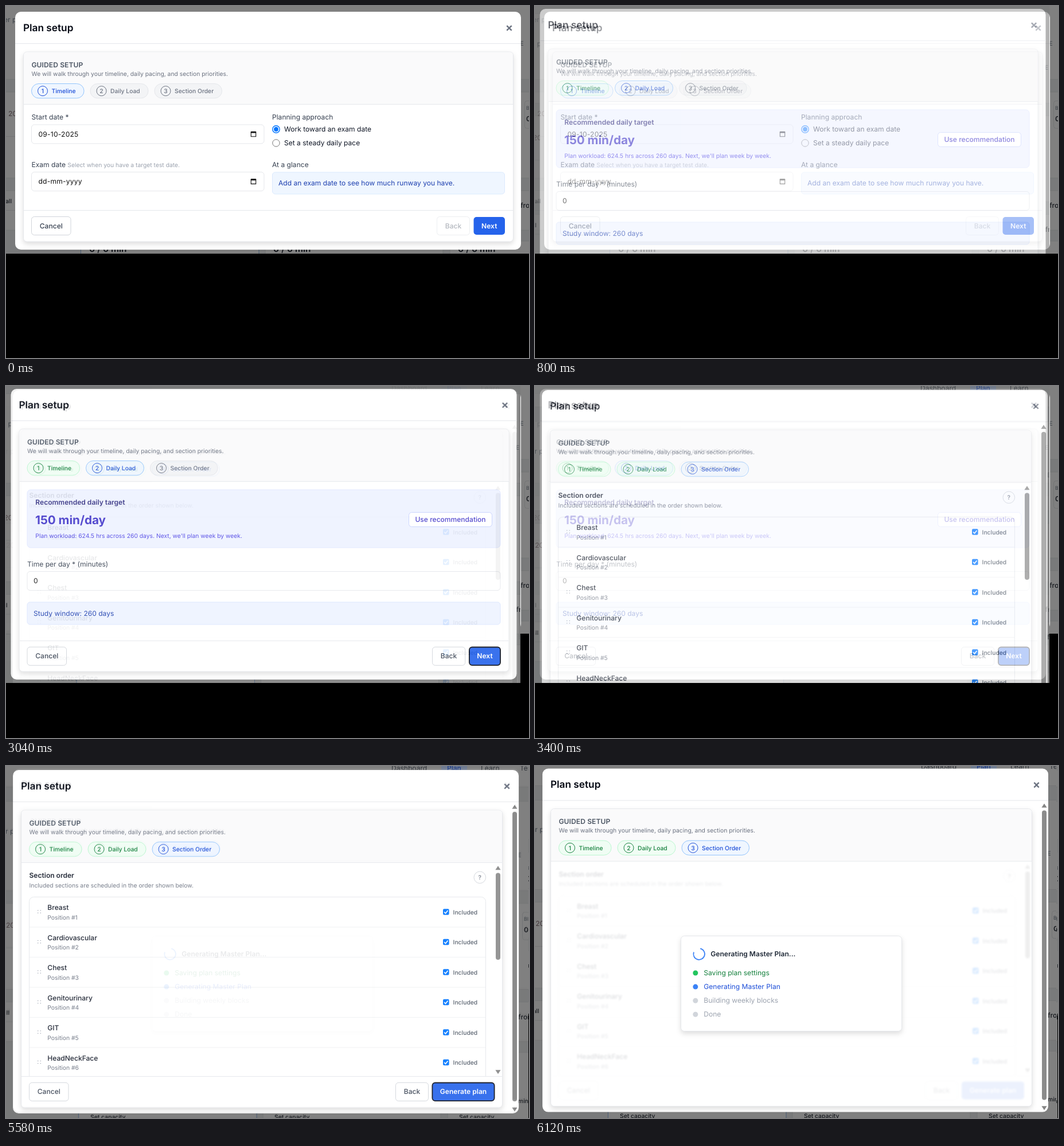
An HTML page that plays this animation: 912 by 614 pixels, repeating every 8000 ms.

```html
<!DOCTYPE html>
<html lang="en">
<head>
<meta charset="utf-8">
<title>Plan setup</title>
<style>
  html, body { margin: 0; width: 100%; height: 100%; overflow: hidden; background: #000; }
  svg { position: absolute; left: 0; top: 0; width: 912px; height: 614px; }
  text { font-family: Inter, sans-serif; text-rendering: geometricPrecision; white-space: pre; }
  .lift { filter: drop-shadow(0 4px 4px rgba(0, 0, 0, .13)); }
  .veiled { opacity: .14; filter: blur(1.7px); }

  #timeline { clip-path: inset(0 0 182px 0); }
  #load { animation: load-fade 8s infinite, load-size 8s step-end infinite; }
  #order { animation: order-fade 8s infinite, order-size 8s step-end infinite; }
  #progress { clip-path: inset(0 3px 0 0); animation: progress-fade 8s infinite; }

  /* each fade runs in ten steps of 60 ms */
  @keyframes load-fade {
    0% { opacity: 0; animation-timing-function: step-end; }
    6.25% { opacity: .1; animation-timing-function: steps(9); }
    13%, 100% { opacity: 1; }
  }
  @keyframes order-fade {
    0% { opacity: 0; animation-timing-function: step-end; }
    38% { opacity: .1; animation-timing-function: steps(9); }
    44.75%, 100% { opacity: 1; }
  }
  @keyframes progress-fade {
    0% { opacity: 0; animation-timing-function: step-end; }
    69.75% { opacity: .1; animation-timing-function: steps(9); }
    76.5%, 100% { opacity: 1; }
  }
  /* while fading, a scene only covers the area of the one below it */
  @keyframes load-size {
    0% { clip-path: inset(0 15px 182px 0); }
    13%, 100% { clip-path: inset(0 15px 96px 0); }
  }
  @keyframes order-size {
    0% { clip-path: inset(0 15px 96px 0); }
    44.75%, 100% { clip-path: inset(0 1px 0 0); }
  }
</style>
</head>
<body>
<svg id="timeline" viewBox="0 0 912 614"></svg>
<svg id="load" viewBox="0 0 912 614"></svg>
<svg id="order" viewBox="0 0 912 614"></svg>
<svg id="progress" viewBox="0 0 912 614"></svg>
<script>
const SCALE = 882 / 1024;
const SMALL = 12 * SCALE, BODY = 14 * SCALE, TITLE = 20 * SCALE, HUGE = 24 * SCALE;
const LINE = '#e5e7eb', LABEL = '#374151', MUTED = '#6b7280', BLUE = '#2563eb', CHECK = '#0075ff';

const text = (x, y, s, size = BODY, fill = LABEL, weight = 400, extra = '') =>
  `<text x="${x}" y="${y}" font-size="${size}" fill="${fill}" font-weight="${weight}" ${extra}>${s}</text>`;
const centered = (x, y, s, size, fill, weight) => text(x, y, s, size, fill, weight, 'text-anchor="middle"');
const rect = (x, y, w, h, fill, r = 0, stroke = 'none', extra = '') =>
  `<rect x="${x}" y="${y}" width="${w}" height="${h}" rx="${r}" fill="${fill}" stroke="${stroke}" ${extra}/>`;
const circle = (x, y, r, fill, stroke = 'none', width = 1) =>
  `<circle cx="${x}" cy="${y}" r="${r}" fill="${fill}" stroke="${stroke}" stroke-width="${width}"/>`;
const path = (d, stroke, width = 1, fill = 'none') =>
  `<path d="${d}" fill="${fill}" stroke="${stroke}" stroke-width="${width}"/>`;
const shift = (x, y, s, extra = '') => `<g transform="translate(${x} ${y})" ${extra}>${s}</g>`;

// Dimmed page behind the dialog
function page(x, y) {
  const card = '#808080', edge = '#737475', ink = '#14171c';
  const mins = [145, 466, 788].map(c =>
    text(c, 429, '0 / 0 min', 18 * SCALE, ink, 600) + text(c + 6, 526.5, 'Set capacity', SMALL, ink, 500)).join('');
  return rect(0, 0, 912, 614, '#797a7b') + shift(x - 16, y,
    rect(-20, -120, 960, 67, card, 0, edge) +
    rect(-20, -28, 960, 156, card, 0, edge) +
    rect(-20, 150, 960, 150, card, 0, edge) +
    rect(-20, 322, 960, 69, card, 0, edge) +
    path('M-20 227.5H20M-20 356.5H20', edge) +
    rect(904.5, 165.5, 40, 48, card, 4, edge) +
    rect(130, 410, 311, 240, card, 0, edge) + rect(452, 410, 310, 240, card, 0, edge) +
    rect(774, 410, 170, 240, card, 0, edge) + path('M130.5 410V650M441 410V650', '#4f6078') +
    rect(763, -95, 45, 18, '#6f7c92', 4) +
    text(676, -82, 'Dashboard', BODY, '#2a2e35') + text(773, -82, 'Plan', BODY, '#1c3a86', 500) +
    text(832, -82, 'Learn', BODY, '#2a2e35') + text(900, -82, 'Tests', BODY, '#2a2e35') +
    text(-4, 28, 'er p', BODY, '#3b4047') + text(4, 192, '20', BODY, '#43393c') + text(-1, 344, 'all', SMALL, ink, 500) +
    text(896.5, 69, 'E', SMALL, '#3b4047') + text(907, 180.5, 'BI', SMALL * .85, '#3b4047') +
    text(907, 200.5, '0', BODY, ink, 600) + text(897, 352, 'from', BODY, ink, 500) +
    text(897, 498, 'min', SMALL, ink, 500) + mins);
}

const pillStyles = {
  active: ['#eff6ff', '#93c5fd', '#1d4ed8'],
  done: ['#f0fdf4', '#bbf7d0', '#15803d'],
  idle: ['#f3f4f6', '#e5e7eb', '#6b7280']
};
function pill(x, w, n, name, state) {
  const [bg, edge, ink] = pillStyles[state];
  return rect(x, 125.5, w, 25.3, bg, 12.6, edge) + circle(x + 19.5, 138.2, 8.5, 'none', ink) +
    centered(x + 19.5, 142, n, SMALL, ink, 500) + text(x + 35, 142, name, SMALL, ink, 500);
}

// Dialog frame with its heading and the three steps
function dialog(x, y, height, panelW, panelH, states) {
  const right = 14.5 + panelW;
  return page(x, { 10: 0, 5: 41.5, 7: 89.7, 4.6: 87.3 }[y]) + shift(x, y,
    rect(0, 0, 882, height, '#fff', 10) +
    text(14, 33.8, 'Plan setup', TITLE, '#030712', 600) +
    path('M857.3 24.3l8.4 8.4m0-8.4l-8.4 8.4', MUTED, 2.4) +
    path('M0 55.5H882', LINE) +
    rect(14.5, 70, panelW, panelH, '#fff', 6, LINE, 'class="lift"') +
    path(`M15 161V76a5.5 5.5 0 0 1 5.5-5.5H${right - 6}a5.5 5.5 0 0 1 5.5 5.5V161z`, 'none', 0, '#fafafb') +
    path(`M15 161.5H${right}`, LINE) +
    text(28.5, 96.5, 'GUIDED SETUP', BODY, '#4b5563', 600, 'letter-spacing=".1"') +
    text(28.5, 111.8, 'We will walk through your timeline, daily pacing, and section priorities.', SMALL, MUTED) +
    pill(28.5, 91.5, 1, 'Timeline', states[0]) +
    pill(131, 101, 2, 'Daily Load', states[1]) +
    pill(243, 117.5, 3, 'Section Order', states[2]));
}

function button(x, y, w, name, ink = LABEL, edge = '#d1d5db') {
  return rect(x, y, w, 32, '#fff', 5, edge) + centered(x + w / 2, y + 20, name, BODY, ink, 500);
}
function primary(x, y, w, name, focus) {
  const box = focus
    ? rect(x + .4, y + .2, w - .8, 31.6, BLUE, 5, '#0b0f19', 'stroke-width="1.8"')
    : rect(x, y + .5, w, 31, BLUE, 5);
  return box + centered(x + w / 2, y + 20, name, BODY, '#fff', 600);
}
const field = (x, y, w, s, ink = '#111', extra = '') =>
  rect(x, y, w, 33, '#fff', 5, LINE) + text(x + 12, y + 20.5, s, BODY, ink, 400, extra);
const calendar = (x, y) => path(`M${x} ${y}h8.4v8h-8.4z`, '#111', 1.1) + rect(x - .5, y - 1, 9.4, 2.8, '#111', 1);

const dateField = (y, s) => field(44.5, y, 405.5, s, '#111', 'letter-spacing=".22"') + calendar(427.3, y + 12.7);

const timelineBody =
  text(44.5, 198.4, 'Start date *') + dateField(207, '09-10-2025') +
  text(44.5, 281, 'Exam date') +
  text(107.3, 281, 'Select when you have a target test date.', SMALL, '#9ca3af') + dateField(289.7, 'dd-mm-yyyy') +
  text(464, 198.4, 'Planning approach') +
  circle(471, 215, 6.2, '#fff', CHECK, 1.4) + circle(471, 215, 3.9, CHECK) +
  text(485, 219.3, 'Work toward an exam date', BODY, '#111827') +
  circle(471, 239, 6.2, '#fff', '#767676') + text(485, 243, 'Set a steady daily pace', BODY, '#111827') +
  text(464, 281, 'At a glance') + rect(464.5, 290, 405, 38, '#eff6ff', 5, '#dbeafe') +
  text(475, 312.5, 'Add an exam date to see how much runway you have.', BODY, '#1e40af') +
  path('M31 356.5H884', LINE) + button(44.5, 367.5, 68.5, 'Cancel') +
  button(751.5, 367.5, 57, 'Back', '#b4b8bf', '#eceef1') + primary(815.5, 367.5, 54.5, 'Next');

const loadBody =
  rect(37, 181, 825, 101, '#eef2ff', 6, '#dfe6ff') +
  text(51.3, 207.4, 'Recommended daily target', BODY, '#312e81', 600) +
  text(51, 240.5, '150 min/day', HUGE, '#4338ca', 700) +
  text(51.3, 265, "Plan workload: 624.5 hrs across 260 days. Next, we'll plan week by week.", SMALL, '#4f46e5') +
  rect(702.5, 220.5, 145, 25, '#fff', 5, '#c7d2fe') +
  centered(775, 236.7, 'Use recommendation', BODY, '#4338ca', 500) +
  text(37, 315.3, 'Time per day * (minutes)') + field(37, 323.5, 825, '') + text(48, 344, '0', BODY, '#111') +
  rect(37, 377, 825, 39, '#eef3ff', 5, '#dbe6fe') + text(48, 400.6, 'Study window: 260 days', BODY, '#1e40af') +
  path('M24 444.5H876', LINE) + button(37, 455.3, 68.5, 'Cancel') +
  button(743.5, 455.3, 57.2, 'Back') + primary(807.5, 455.3, 55, 'Next', true);

function scrollbar(x, top, thumbTop, thumbEnd, bottom) {
  return path(`M${x} ${top - 3.7}l4.6 7h-9.2zM${x} ${bottom + 3.7}l4.6-7h-9.2z`, 'none', 0, '#858585') +
    rect(x - 4, thumbTop, 8, thumbEnd - thumbTop, '#8b8b8b', 4);
}

function sectionRow(name, i) {
  const sep = i ? path('M41 .5H836', '#f0f1f3') : '';
  const grip = [55.7, 60.3].map(x => circle(x, 24, .8, '#9ca3af') + circle(x, 28.2, .8, '#9ca3af')).join('');
  return shift(0, 228 + 52.5 * i, sep + grip +
    text(72.3, 23.2, name, BODY, '#111827', 500) + text(72.3, 39.6, `Position #${i + 1}`, SMALL, MUTED) +
    rect(762, 21.2, 10.6, 10.6, CHECK, 2) + path('M764.2 26.6l2.3 2.4 4-5', '#fff', 1.6) +
    text(779.6, 30.7, 'Included', SMALL, '#4b5563', 500));
}

function orderBody(busy) {
  const sections = ['Breast', 'Cardiovascular', 'Chest', 'Genitourinary', 'GIT', 'HeadNeckFace'];
  return text(40.5, 195.2, 'Section order', BODY, '#111827', 600) +
    text(40.5, 211.5, 'Included sections are scheduled in the order shown below.', SMALL, MUTED) +
    circle(826.3, 194.3, 10.3, '#fff', '#d1d5db') + centered(826.3, 198.2, '?', SMALL, MUTED, 500) +
    path('M40.5 541V236.5a8 8 0 0 1 8-8H828.5a8 8 0 0 1 8 8V541', LINE) +
    sections.map(sectionRow).join('') +
    scrollbar(858, 178, 186.5, 338, 533.5) +
    path('M27 541.5H866', LINE) +
    `<g opacity="${busy ? .6 : 1}">` + button(40.5, 552.3, 68.5, 'Cancel') +
    button(679.5, 552.3, 57, 'Back') + primary(743, 552.3, 109, 'Generate plan', !busy) + '</g>';
}

function progressCard() {
  const steps = [
    ['Saving plan settings', '#15803d', '#22c55e'],
    ['Generating Master Plan', '#1d4ed8', '#3b82f6'],
    ['Building weekly blocks', '#9ca3af', '#d1d5db'],
    ['Done', '#9ca3af', '#d1d5db']
  ];
  return rect(254.5, 296.5, 385, 166, '#fff', 6, LINE, 'class="lift"') +
    path('M288.2 318.4A9.8 9.8 0 1 1 276.9 324.6', '#3b82f6', 1.8) +
    text(306.3, 332.3, 'Generating Master Plan...', BODY, '#1f2937', 600) +
    steps.map(([s, ink, dot], i) =>
      circle(279.8, 361 + 24.1 * i, 4.5, dot) + text(294.3, 364.7 + 24.1 * i, s, BODY, ink)).join('');
}

const outerBar = scrollbar(887, 71.5, 80, 585, 599);
const draw = (id, s) => { document.getElementById(id).innerHTML = s; };

draw('timeline', dialog(16, 10, 415, 854, 331, ['active', 'idle', 'idle']) + timelineBody);
draw('load', dialog(8.5, 5, 507, 854, 423, ['done', 'active', 'idle']) + loadBody);
draw('order', dialog(12, 7, 599, 839, 519, ['done', 'done', 'active']) + orderBody(false) + outerBar);
draw('progress', dialog(13, 4.6, 599, 839, 519, ['done', 'done', 'active']) +
  shift(1, -2.4, orderBody(true), 'class="veiled"') + shift(1, -2.4, outerBar) + progressCard());
</script>
</body>
</html>
```
